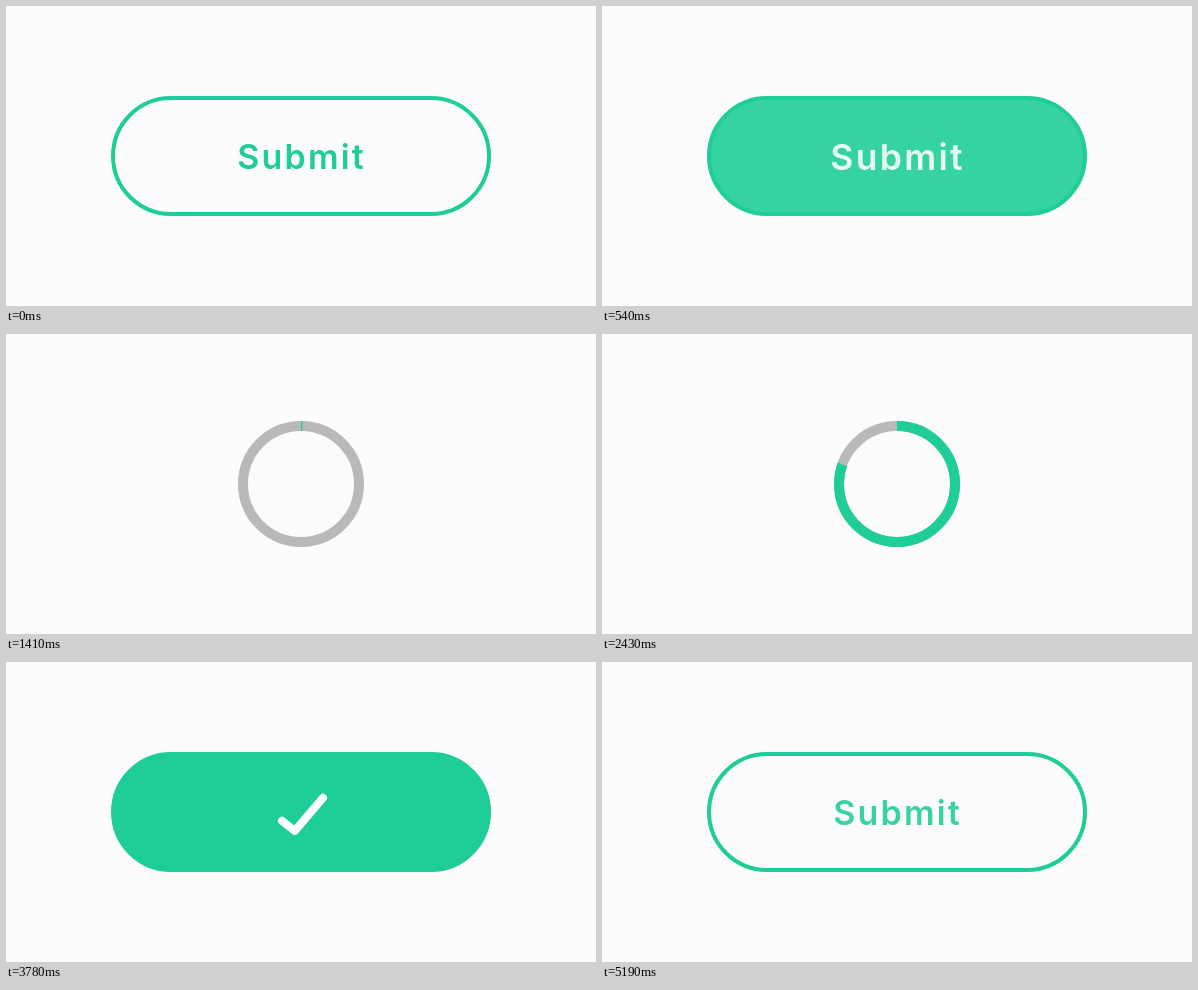
An HTML page for the animation above (5220 ms loop, 590 px wide and 300 px high).

```html
<!DOCTYPE html>
<html lang="en">
<head>
<meta charset="utf-8">
<title>Submit button</title>
<style>
  html, body { margin: 0; width: 100%; height: 100%; overflow: hidden; background: #fcfcfc; }
  svg { display: block; width: 100%; height: 100%; }
  text { font: 600 34px Inter, "Open Sans", sans-serif; letter-spacing: 2.2px; text-anchor: middle; }
</style>
</head>
<body>
<svg viewBox="0 0 590 300">
  <rect id="button" y="92" height="116" rx="58"/>
  <circle id="arc" cx="295" cy="150" r="58" fill="none" stroke="#1ecd97" stroke-width="10"
    pathLength="1" transform="rotate(-90 295 150)"/>
  <g id="label"><text x="295.6" y="163">Submit</text></g>
  <path id="check" d="M276 158.8 L288.8 168.8 L317 135.8" fill="none" stroke="#fff"
    stroke-width="8" stroke-linecap="round" stroke-linejoin="round"/>
</svg>
<script>
const LOOP = 5220, TICK = 30, CX = 295, CY = 150;
const GREEN = [30, 205, 151], GRAY = [185, 185, 185], WHITE = [255, 255, 255];

const [button, arc, label, check] =
  ["button", "arc", "label", "check"].map(id => document.getElementById(id));

const lerp = (a, b, p) => a + (b - a) * p;
const mix = (a, b, p) => `rgb(${a.map((v, i) => Math.round(lerp(v, b[i], p)))})`;
const span = (t, from, to) => Math.min(1, Math.max(0, (t - from) / (to - from)));
const ease = (t, from, to) => {
  const p = span(t, from, to);
  return p * p * (3 - 2 * p);
};

// Steep ease: Bezier with control points (x1, 0) and (x2, 1), solved by bisection.
function steepEase(x, x1, x2) {
  let lo = 0, hi = 1;
  for (let i = 0; i < 30; i++) {
    const s = (lo + hi) / 2, r = 1 - s;
    if (3 * x1 * s * r * r + 3 * x2 * s * s * r + s ** 3 < x) lo = s;
    else hi = s;
  }
  return lo * lo * (3 - 2 * lo);
}

function set(el, attrs) {
  for (const name in attrs) el.setAttribute(name, attrs[name]);
}

function draw(t) {
  const hover = ease(t, 300, 600);
  const round = ease(t, 750, 1290) - ease(t, 3450, 3780);
  const fill = hover - ease(t, 750, 1290) + ease(t, 3420, 3780) - ease(t, 4740, 4995);
  const width = lerp(376, 116, round);
  const loaded = t >= 3450;

  set(button, {
    x: CX - width / 2,
    width,
    fill: mix(GREEN, GREEN, 0),
    "fill-opacity": fill,
    stroke: loaded ? mix(GREEN, GREEN, 0) : mix(GREEN, GRAY, ease(t, 750, 1290)),
    "stroke-width": lerp(4, 10, round)
  });

  const progress = steepEase(span(t, 1230, 3392), 0.83, 0.1);
  set(arc, {
    "stroke-dasharray": `${progress} 2`,
    visibility: progress > 0 && !loaded ? "visible" : "hidden"
  });

  const returning = t > 4740;
  const scale = returning ? 1 : lerp(1, 1.05, hover);
  set(label, {
    transform: `translate(${CX} ${CY}) scale(${scale}) translate(${-CX} ${-CY})`,
    fill: returning ? mix(GREEN, GREEN, 0) : mix(GREEN, WHITE, hover),
    opacity: returning ? ease(t, 4980, 5250) : 1 - ease(t, 750, 990)
  });

  const grow = ease(t, 3540, 3780);
  set(check, {
    transform: `translate(${CX} ${CY}) scale(${lerp(0.6, 1, grow)}) translate(${-CX} ${-CY})`,
    opacity: grow * (1 - ease(t, 4740, 4995))
  });
}

const start = performance.now();
function frame() {
  const t = (performance.now() - start) % LOOP;
  draw(Math.floor(t / TICK) * TICK);
  requestAnimationFrame(frame);
}
frame();
</script>
</body>
</html>
```
